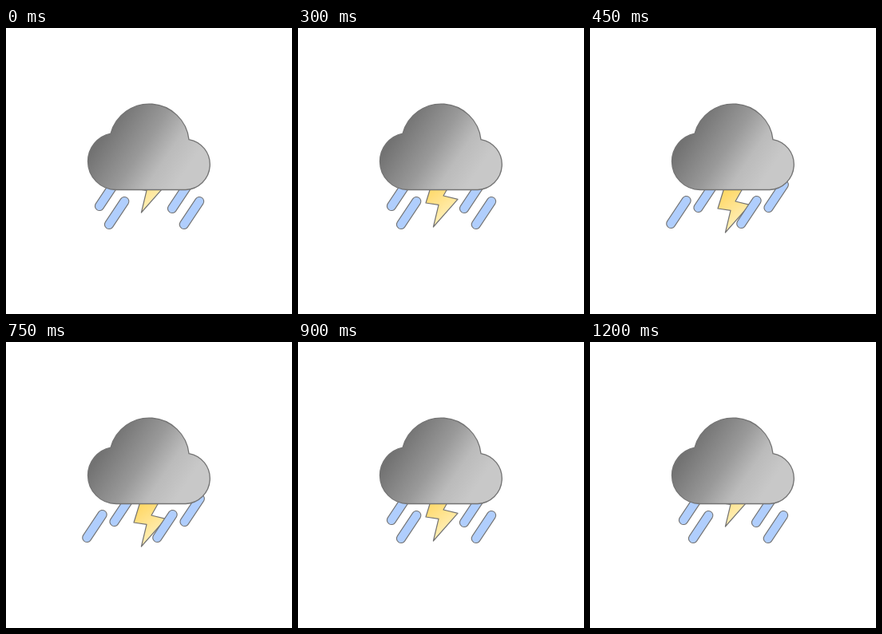
Write an HTML page that moves like this. It is 358 px wide and 358 px high and loops after 1.35 s.

```html
<!DOCTYPE html>
<html lang="en">
<head>
<meta charset="utf-8">
<title>Thunderstorm</title>
<style>
  html, body { margin: 0; width: 100%; height: 100%; overflow: hidden; background: #fff; }
  svg { display: block; width: 100vw; height: 100vh; }
  .bolt, .rain { animation: 1350ms step-end infinite; }
  .bolt { animation-name: strike; }
  .rain.even { animation-name: even; }
  .rain.odd { animation-name: odd; }

  /* nine equal steps: the bolt drops out and retreats, the rain alternates */
  @keyframes strike {
    0%, 88.889%, 100% { transform: translateY(-25px); }
    11.111%, 77.778% { transform: translateY(-14px); }
    22.222%, 66.667% { transform: translateY(-7px); }
    33.333%, 55.556% { transform: translateY(0); }
    44.444% { transform: translateY(3px); }
  }
  @keyframes even {
    0%, 22.222%, 44.444%, 66.667%, 88.889%, 100% { opacity: 1; }
    11.111%, 33.333%, 55.556%, 77.778% { opacity: 0; }
  }
  @keyframes odd {
    0%, 22.222%, 44.444%, 66.667%, 88.889%, 100% { opacity: 0; }
    11.111%, 33.333%, 55.556%, 77.778% { opacity: 1; }
  }
</style>
</head>
<body>
<svg viewBox="0 0 358 358">
  <defs>
    <linearGradient id="steel" gradientUnits="userSpaceOnUse" x1="121" y1="135" x2="213" y2="197">
      <stop offset="0" stop-color="#727272"/>
      <stop offset=".45" stop-color="#999"/>
      <stop offset=".73" stop-color="#bbb"/>
      <stop offset="1" stop-color="#c8c8c8"/>
    </linearGradient>
    <linearGradient id="gold" gradientUnits="userSpaceOnUse" x1="165" y1="203" x2="190" y2="240">
      <stop offset="0" stop-color="#ffd660"/>
      <stop offset="1" stop-color="#ffeeb4"/>
    </linearGradient>
    <!-- the lower end of a drop sits at the origin -->
    <g id="drop" fill="none" stroke-linecap="round">
      <path d="M0 0L19.3 -29" stroke="#737373" stroke-width="12.2"/>
      <path d="M0 0L19.3 -29" stroke="#b0cefd" stroke-width="10"/>
    </g>
  </defs>

  <path class="bolt" d="M172 187L199 187L182 217L200 221.3L169.4 256L176 228.3L160 226Z"
        fill="url(#gold)" stroke="#737373" stroke-width="1.2" stroke-linejoin="round"/>

  <g class="rain even">
    <use href="#drop" x="117" y="223"/>
    <use href="#drop" x="129" y="246"/>
    <use href="#drop" x="208" y="226"/>
    <use href="#drop" x="222.8" y="246"/>
  </g>
  <g class="rain odd">
    <use href="#drop" x="101.3" y="245"/>
    <use href="#drop" x="135.5" y="225"/>
    <use href="#drop" x="189.3" y="245"/>
    <use href="#drop" x="223.5" y="225"/>
  </g>

  <path d="M138 202.5A35.5 35.5 0 0 1 102.5 167A35.5 35.5 0 0 1 131 132.2
           A50 50 0 0 1 229 139.6A31.7 31.7 0 0 1 225 202.5Z"
        fill="url(#steel)" stroke="#737373" stroke-width="1.3" stroke-linejoin="round"/>
</svg>
</body>
</html>
```
